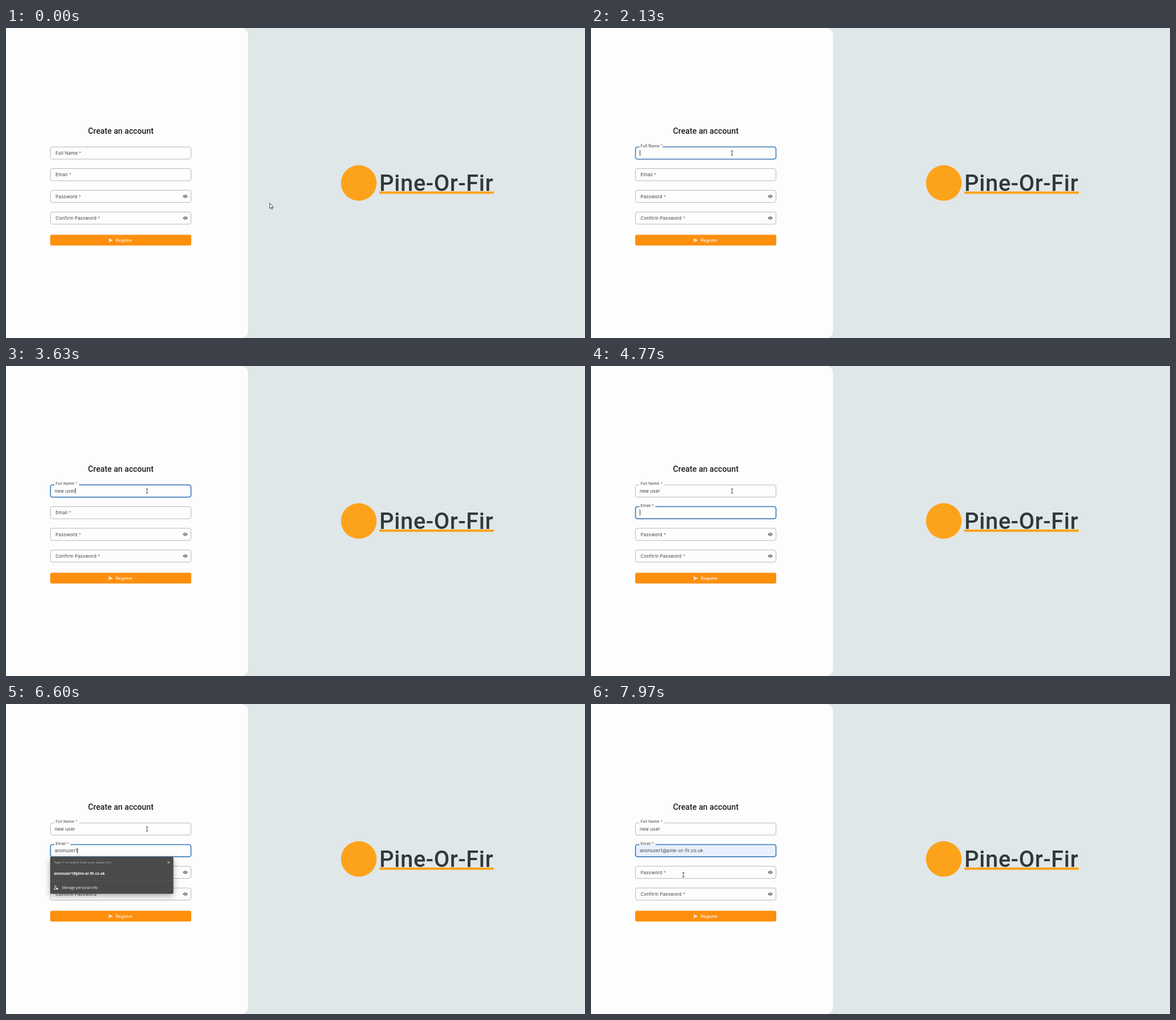
Recreate the animation shown at these times as an HTML page with a canvas. Size 1022 by 548 pixels, loop 8 s.

```html
<!DOCTYPE html>
<html lang="en">
<head>
<meta charset="utf-8">
<title>Create an account</title>
<style>
  html, body { margin: 0; width: 100%; height: 100%; overflow: hidden; background: #e0e7e9; }
  canvas { display: block; width: 1022px; height: 548px; }
</style>
</head>
<body>
<canvas id="stage"></canvas>
<script>
const W = 1022, H = 548, LOOP = 8000;
const canvas = document.getElementById('stage');
const ctx = canvas.getContext('2d');
const dpr = window.devicePixelRatio || 1;
canvas.width = W * dpr;
canvas.height = H * dpr;

const INTER = 'Inter, sans-serif';
const ROBOTO = 'Roboto, sans-serif';
const MENU = '"Open Sans", "Noto Sans", sans-serif';
const PANEL = '#fdfdfe', ORANGE = '#fd8f0d', AMBER = '#fda31b', INK = '#3f4144';

const BRAND = 'Pine-Or-Fir';
const NAME = 'new user';
const EMAIL = 'anonuser1@pine-or-fir.co.uk';

// Key press times
const nameKeys = [2650, 2930, 3030, 3150, 3260, 3370, 3470, 3560];
const mailKeys = [5490, 5550, 5620, 5760, 5900, 6010, 6120, 6220, 6420];
const CLICK = 2015, TAB = 4400, PICK = 6700, ENTER = 7110;

const FIELD_X = 78.5, FIELD_W = 248, FIELD_H = 21.5;
const fields = [
  { label: 'Full Name', y: 221 },
  { label: 'Email', y: 259.3 },
  { label: 'Password', y: 297.6, eye: true },
  { label: 'Confirm Password', y: 336, eye: true }
];

const savedNames = ['test user', 'nodu', 'sample user', 'first user', 'guest', 'admin user', 'other user'];
const savedMails = [
  EMAIL, 'anon10@fir.test', ['anon1@pine-or-fir.com', 'test user'],
  'anon1@pine-or-fir.co.uk', 'anon1@fir.test', 'anon10@pine-or-fir.co.uk'
];

const clamp = v => Math.max(0, Math.min(1, v));
const ramp = (t, start, span) => clamp((t - start) / span);
const easeOut = p => 1 - (1 - p) ** 3;
const easeInOut = p => p * p * (3 - 2 * p);
const mix = (a, b, p) => a + (b - a) * p;
const typed = (keys, t) => keys.filter(k => k <= t).length;

function text(str, x, y, size, font, color, weight = 400, spacing = 0) {
  ctx.font = `${weight} ${size}px ${font}`;
  ctx.letterSpacing = spacing + 'px';
  ctx.fillStyle = color;
  ctx.fillText(str, x, y);
  return ctx.measureText(str).width;
}

function box(x, y, w, h, r, fill, stroke, line = 1) {
  ctx.beginPath();
  ctx.roundRect(x, y, w, h, r);
  if (fill) { ctx.fillStyle = fill; ctx.fill(); }
  if (stroke) { ctx.strokeStyle = stroke; ctx.lineWidth = line; ctx.stroke(); }
}

function path(points, close) {
  ctx.beginPath();
  points.forEach(([x, y], i) => i ? ctx.lineTo(x, y) : ctx.moveTo(x, y));
  if (close) ctx.closePath();
}

function drawEye(x, y) {
  ctx.fillStyle = '#5c5e60';
  ctx.beginPath();
  ctx.moveTo(x - 4.3, y);
  ctx.quadraticCurveTo(x, y - 6, x + 4.3, y);
  ctx.quadraticCurveTo(x, y + 6, x - 4.3, y);
  ctx.fill();
  ctx.fillStyle = PANEL;
  ctx.beginPath();
  ctx.arc(x, y, 2, 0, 7);
  ctx.fill();
  ctx.fillStyle = '#5c5e60';
  ctx.beginPath();
  ctx.arc(x, y, 1.2, 0, 7);
  ctx.fill();
}

function drawField(f, { value = '', float = 0, focus = 0, filled = false, caret = false } = {}) {
  const top = f.y - FIELD_H / 2;
  box(FIELD_X, top, FIELD_W, FIELD_H, 3.5, filled ? '#e8f0fe' : PANEL, '#b7b7af');
  if (focus > 0) {
    ctx.globalAlpha = focus;
    box(FIELD_X, top, FIELD_W, FIELD_H, 3.5, null, '#3576b8', 1.6);
    ctx.globalAlpha = 1;
  }

  const size = mix(8, 6.8, float), gap = mix(0.15, 0.12, float);
  const baseline = mix(f.y + 2.9, f.y - 10.6, float);
  if (float > 0) {
    ctx.font = `400 ${size}px ${INTER}`;
    ctx.letterSpacing = gap + 'px';
    const w = ctx.measureText(f.label + ' *').width;
    ctx.fillStyle = PANEL;
    ctx.fillRect(85.5, top - 1.2, (w + 5) * float, 2.4);
  }
  const w = text(f.label + ' ', 87.6, baseline, size, INTER, INK, 400, gap);
  text('*', 87.6 + w, baseline, size, INTER, '#d9493c', 400, gap);

  const end = 86 + (value ? text(value, 86, f.y + 2.6, 8, INTER, INK, 400, 0.15) : 0);
  if (caret) {
    ctx.fillStyle = '#222';
    ctx.fillRect(end, f.y - 5.3, 0.9, 10);
  }
  if (f.eye) drawEye(316.5, f.y);
}

function drawPerson(x, y) {
  ctx.strokeStyle = '#eee';
  ctx.lineWidth = 0.8;
  ctx.beginPath();
  ctx.arc(x - 0.8, y - 2, 1.6, 0, 7);
  ctx.stroke();
  ctx.beginPath();
  ctx.moveTo(x, y + 3.4);
  ctx.lineTo(x - 3.4, y + 3.4);
  ctx.quadraticCurveTo(x - 3.4, y + 0.6, x, y + 0.6);
  ctx.stroke();
  box(x + 0.6, y + 0.6, 3.2, 2.8, 0.5, '#eee');
}

// Autofill list hanging below a field
function drawMenu(top, items, alpha, picked, closing) {
  if (alpha <= 0) return;
  const step = 20.8, extra = items.some(Array.isArray) ? 10.4 : 0;
  const last = top + 29.5 + step * (items.length - 1) + extra;
  const h = last + 36 - top, w = 217.5;
  ctx.save();
  ctx.globalAlpha = alpha;
  if (closing) {
    ctx.translate(78 + w / 2, top + h / 2);
    ctx.scale(0.99, 0.99);
    ctx.translate(-78 - w / 2, -top - h / 2);
  }
  ctx.shadowColor = 'rgba(0,0,0,0.32)';
  ctx.shadowBlur = 12 * dpr;
  ctx.shadowOffsetY = 4 * dpr;
  box(78, top, w, h, 2, '#4a4a48');
  ctx.shadowColor = 'transparent';

  text("Type '/' to search from your saved info", 84.5, top + 12, 5.7, MENU, '#b9b9b7');
  ctx.strokeStyle = '#eee';
  ctx.lineWidth = 0.8;
  for (const s of [-1, 1]) {
    path([[285, top + 10 - 2.2 * s], [289.4, top + 10 + 2.2 * s]]);
    ctx.stroke();
  }

  let y = top + 29.5;
  items.forEach((item, i) => {
    const [main, sub] = [].concat(item);
    if (picked && i === 0) box(81.5, y - 10.3, 210, 20.4, 2, '#6a6a68');
    text(main, 84.8, y + 2.2, 6.3, MENU, '#fff', 700);
    if (sub) {
      text(sub, 84.8, y + 12.8, 6.2, MENU, '#f2f2f2');
      y += extra;
    }
    y += step;
  });
  ctx.fillStyle = '#585856';
  ctx.fillRect(78, last + 13, w, 0.7);
  drawPerson(88, last + 25);
  text('Manage personal info', 99, last + 27.2, 6.2, MENU, '#f4f4f4');
  ctx.restore();
}

function drawPointer(x, y) {
  const overField = x > 78 && x < 327 && fields.some(f => Math.abs(y - f.y) < 11);
  if (overField) {
    ctx.strokeStyle = '#333';
    ctx.lineWidth = 0.9;
    path([[x, y - 3.6], [x, y + 3.6]]);
    ctx.stroke();
    for (const s of [-1, 1]) {
      path([[x - 2, y + 4 * s], [x - 0.4, y + 3.6 * s], [x + 0.4, y + 3.6 * s], [x + 2, y + 4 * s]]);
      ctx.stroke();
    }
    return;
  }
  ctx.save();
  ctx.translate(x, y - 5);
  path([[0, 0], [0, 9.6], [2.2, 7.7], [3.7, 11], [5.1, 10.4], [3.7, 7.2], [6.5, 7]], true);
  ctx.fillStyle = '#fff';
  ctx.fill();
  ctx.strokeStyle = '#333';
  ctx.lineWidth = 0.9;
  ctx.stroke();
  ctx.restore();
}

function drawPage() {
  ctx.fillStyle = '#e0e7e9';
  ctx.fillRect(0, 0, W, H);
  box(0, 0, 427, H, [0, 12, 12, 0], PANEL);

  ctx.textAlign = 'center';
  text('Create an account', 202.6, 186.8, 14.2, ROBOTO, '#1d1e20', 500);
  ctx.textAlign = 'left';

  box(78, 365.5, 249, 19, 3, ORANGE);
  path([[181.3, 372], [188.6, 375.3], [181.3, 378.6], [181.3, 376], [185.5, 375.3], [181.3, 374.6]], true);
  ctx.fillStyle = '#fff';
  ctx.fill();
  text('Register', 193.7, 377.9, 7.2, INTER, '#fff', 500, 0.2);

  ctx.fillStyle = AMBER;
  ctx.beginPath();
  ctx.arc(622.7, 274, 31.5, 0, 7);
  ctx.fill();
  ctx.fillRect(659, 289, 202, 4.2);
  text(BRAND, 659, 288, 40, ROBOTO, '#30383c', 500, 0.7);
}

function drawForm(t) {
  const events = [CLICK, ...nameKeys, TAB, ...mailKeys, PICK, ENTER];
  const lastEvent = Math.max(...events.filter(e => e <= t), 0);
  const blink = t >= CLICK && (t - lastEvent) % 1060 < 530;
  const picked = t >= PICK;

  drawField(fields[0], {
    value: NAME.slice(0, typed(nameKeys, t)),
    float: easeOut(ramp(t, CLICK, 200)),
    focus: easeOut(ramp(t, CLICK, 200)) * (t < TAB ? 1 : 0),
    caret: blink && t < TAB
  });
  drawField(fields[1], {
    value: picked ? EMAIL : EMAIL.slice(0, typed(mailKeys, t)),
    float: easeOut(ramp(t, TAB, 200)),
    focus: easeOut(ramp(t, TAB, 200)),
    filled: picked,
    caret: blink && t >= TAB
  });
  drawField(fields[2]);
  drawField(fields[3]);
}

function drawMenus(t) {
  const shade = (open, close) => ramp(t, open, 90) * (1 - ramp(t, close, 200));
  const nameClose = 2945, mailClose = 7120;
  drawMenu(231.7, t < nameKeys[0] ? savedNames : ['nodu'], shade(2150, nameClose), false, t > nameClose);
  drawMenu(270, t < mailKeys[4] ? savedMails : [EMAIL], shade(5575, mailClose), t >= PICK, t > mailClose);
}

function pointerAt(t) {
  const a = easeInOut(ramp(t, 600, 750));
  const b = easeInOut(ramp(t, 7300, 600));
  return [mix(mix(465.5, 249, a), 163, b), mix(mix(314.5, 221, a), 302, b)];
}

function frame(now) {
  const t = now % LOOP;
  ctx.setTransform(dpr, 0, 0, dpr, 0, 0);
  drawPage();
  drawForm(t);
  drawMenus(t);
  drawPointer(...pointerAt(t));
  requestAnimationFrame(frame);
}
requestAnimationFrame(frame);
</script>
</body>
</html>
```
